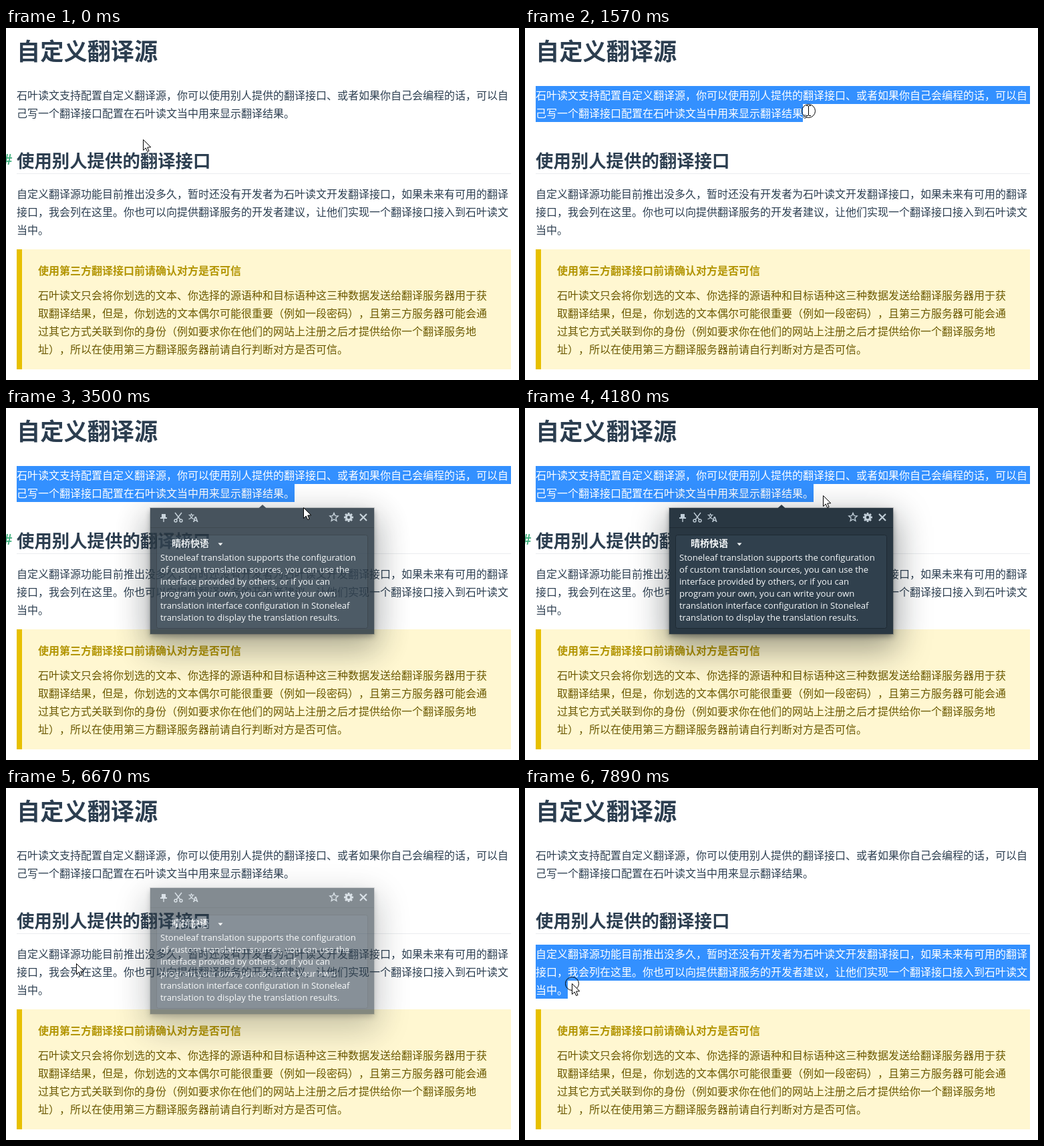
An HTML page with a canvas that plays this animation: 768x528 px, repeating every 8000 ms.

```html
<!DOCTYPE html>
<html lang="zh-CN">
<head>
<meta charset="utf-8">
<title>Selection translation</title>
<style>
html, body { margin: 0; width: 100%; height: 100%; overflow: hidden; background: #fff; }
canvas { display: block; }
</style>
</head>
<body>
<canvas id="stage" width="768" height="528"></canvas>
<script>
const W = 768, H = 528, LOOP = 8000;
const stage = document.getElementById('stage').getContext('2d');
const layer = document.createElement('canvas');
layer.width = W;
layer.height = H;
const pop = layer.getContext('2d');

const CJK = '"Noto Sans CJK SC", "Noto Sans CJK", sans-serif';
const LATIN = '"Open Sans", "Noto Sans", sans-serif';
const INK = '#2c3e50', BLUE = '#3390ff', PALE = '#f5f8fa';
const LEFT = 16, RIGHT = 756, SIZE = 16, ROW = 27;
const BOX = { x: 216, y: 150, w: 335, h: 189 };

const intro = { top: 87, lines: [
  '石叶读文支持配置自定义翻译源，你可以使用别人提供的翻译接口、或者如果你自己会编程的话，可以自',
  '己写一个翻译接口配置在石叶读文当中用来显示翻译结果。'
] };
const usage = { top: 235, lines: [
  '自定义翻译源功能目前推出没多久，暂时还没有开发者为石叶读文开发翻译接口，如果未来有可用的翻译',
  '接口，我会列在这里。你也可以向提供翻译服务的开发者建议，让他们实现一个翻译接口接入到石叶读文',
  '当中。'
] };
const warning = [
  '石叶读文只会将你划选的文本、你选择的源语种和目标语种这三种数据发送给翻译服务器用于获',
  '取翻译结果，但是，你划选的文本偶尔可能很重要（例如一段密码），且第三方服务器可能会通',
  '过其它方式关联到你的身份（例如要求你在他们的网站上注册之后才提供给你一个翻译服务地',
  '址），所以在使用第三方翻译服务器前请自行判断对方是否可信。'
];
const result = [
  'Stoneleaf translation supports the configuration',
  'of custom translation sources, you can use the',
  'interface provided by others, or if you can',
  'program your own, you can write your own',
  'translation interface configuration in Stoneleaf',
  'translation to display the translation results.'
];

// Pointer moves: start and end time, destination, optional bend.
const home = [205, 167];
const moves = [
  { from: 30, to: 780, end: [20, 98] },
  { from: 910, to: 1600, end: [425, 124], bend: [237, 90] },
  { from: 1940, to: 2430, end: [426, 129] },
  { from: 2960, to: 3200, end: [444, 152] },
  { from: 3340, to: 3680, end: [445, 148] },
  { from: 3840, to: 3900, end: [446, 131] },
  { from: 4180, to: 4210, end: [440, 126] },
  { from: 4400, to: 5020, end: [112, 288], bend: [100, 95] },
  { from: 5180, to: 5920, end: [345, 184], bend: [255, 356] },
  { from: 5990, to: 6450, end: [105, 263], bend: [290, 150] },
  { from: 7250, to: 7420, end: [18, 248] },
  { from: 7480, to: 7890, end: [70, 293] }
];

const within = (t, a, b) => t >= a && t < b;
const clamp = (v, a, b) => Math.min(b, Math.max(a, v));
const held = t => within(t, 910, 2710) || t >= 7480;

function pointer(t) {
  let at = home;
  for (const { from, to, end, bend } of moves) {
    if (t <= from) break;
    const e = Math.sin(clamp((t - from) / (to - from), 0, 1) * Math.PI / 2);
    at = at.map((a, k) => {
      const mid = bend ? bend[k] : (a + end[k]) / 2;
      return (1 - e) ** 2 * a + 2 * e * (1 - e) * mid + e * e * end[k];
    });
  }
  return { x: at[0], y: at[1] };
}

function chars(c, text, x, y, size, color, weight = 400) {
  c.font = `${weight} ${size}px ${CJK}`;
  c.fillStyle = color;
  [...text].forEach((ch, i) => c.fillText(ch, x + i * size, y));
}

function paragraph(block, sel) {
  block.lines.forEach((text, i) => {
    const top = block.top + i * ROW;
    chars(stage, text, LEFT, top + 20, SIZE, INK);
    if (!sel || i > sel.row) return;
    const end = i < sel.row ? RIGHT : LEFT + sel.col * SIZE;
    stage.save();
    stage.beginPath();
    stage.rect(LEFT, top, end - LEFT, ROW);
    stage.clip();
    stage.fillStyle = BLUE;
    stage.fillRect(LEFT, top, end - LEFT, ROW);
    chars(stage, text, LEFT, top + 20, SIZE, '#fff');
    stage.restore();
  });
}

// Selection from the start of a block to the pointer, which it trails slightly.
function dragged(block, t) {
  const p = pointer(t - 30);
  const row = clamp(Math.floor((p.y - block.top) / ROW), 0, block.lines.length - 1);
  const col = clamp(Math.round((p.x - LEFT) / SIZE), 0, block.lines[row].length);
  return { row, col };
}

function page(t) {
  stage.fillStyle = '#fff';
  stage.fillRect(0, 0, W, H);
  chars(stage, '自定义翻译源', LEFT, 48, 35.2, INK, 700);
  paragraph(intro, within(t, 910, 6620) ? dragged(intro, Math.min(t, 2700)) : null);
  chars(stage, '使用别人提供的翻译接口', LEFT, 209, 26.4, INK, 700);
  stage.fillStyle = '#eaecef';
  stage.fillRect(LEFT, 218, RIGHT - LEFT, 1);
  if (t < 660 || within(t, 3370, 4830)) {
    stage.font = `600 21px ${LATIN}`;
    stage.fillStyle = '#3eaf7c';
    stage.fillText('#', -4, 205);
  }
  paragraph(usage, t >= 7500 ? dragged(usage, t) : null);

  stage.fillStyle = '#fff7d1';
  stage.fillRect(LEFT, 332, 740, 180);
  stage.fillStyle = '#e7c000';
  stage.fillRect(LEFT, 332, 8, 180);
  chars(stage, '使用第三方翻译接口前请确认对方是否可信', 48, 370, SIZE, '#b29400', 700);
  warning.forEach((s, i) => chars(stage, s, 48, 407 + i * ROW, SIZE, '#6b5900'));
}

// Draws an icon around its centre.
function icon(draw, x, y, color = '#bfccd6') {
  pop.save();
  pop.translate(x, y);
  pop.fillStyle = pop.strokeStyle = color;
  pop.lineWidth = 1.4;
  pop.beginPath();
  draw(pop);
  pop.restore();
}

function poly(c, ...pts) {
  c.beginPath();
  pts.forEach(([x, y]) => c.lineTo(x, y));
  c.closePath();
}

function pin(c) {
  c.fillRect(-3, -5, 6, 6);
  c.fillRect(-5, 0, 10, 2);
  c.fillRect(-.7, 2, 1.4, 5);
}

function scissors(c) {
  [-1, 1].forEach(s => {
    c.moveTo(s * 5, -7);
    c.lineTo(s * -3, 3.5);
    c.moveTo(s * 4 + 2, 5);
    c.arc(s * 4, 5, 2, 0, 7);
  });
  c.stroke();
}

function letters(c) {
  c.font = `700 9px ${CJK}`;
  c.fillText('文', -7, 2);
  c.font = `700 11px ${LATIN}`;
  c.fillText('A', 0, 7);
}

function star(c) {
  poly(c, ...Array.from({ length: 10 }, (_, i) => {
    const a = i * Math.PI / 5, r = i % 2 ? 3 : 6.5;
    return [Math.sin(a) * r, -Math.cos(a) * r];
  }));
  c.stroke();
}

function cog(c) {
  c.lineWidth = 3;
  c.arc(0, 0, 3.7, 0, 7);
  c.stroke();
  for (let i = 0; i < 8; i++) {
    c.fillRect(-1.4, -7, 2.8, 3);
    c.rotate(Math.PI / 4);
  }
}

function cross(c) {
  c.lineWidth = 2.2;
  [-5, 5].forEach(s => { c.moveTo(-5, s); c.lineTo(5, -s); });
  c.stroke();
}

function caret(c) {
  poly(c, [-3.5, -1.5], [3.5, -1.5], [0, 2.5]);
  c.fill();
}

function speaker(c) {
  poly(c, [-6, -2], [-4, -2], [-.5, -5], [-.5, 5], [-4, 2], [-6, 2]);
  c.fill();
  [3, 5.5].forEach(r => {
    c.beginPath();
    c.arc(0, 0, r, -.8, .8);
    c.stroke();
  });
}

function copy(c) {
  c.strokeRect(-5, -2, 7, 7);
  c.moveTo(-2, -2);
  c.lineTo(-2, -5); c.lineTo(5, -5); c.lineTo(5, 2); c.lineTo(2, 2);
  c.stroke();
}

function share(c) {
  c.moveTo(0, -4);
  c.lineTo(-5, -4); c.lineTo(-5, 5); c.lineTo(4, 5); c.lineTo(4, 1);
  c.moveTo(-1, 1); c.lineTo(5, -5);
  c.moveTo(1.5, -5); c.lineTo(5, -5); c.lineTo(5, -1.5);
  c.stroke();
}

// Casts a shadow alone: the rectangle itself stays off the canvas.
function shadow(dy, blur, grow, alpha) {
  const away = 2000;
  pop.save();
  pop.shadowColor = `rgba(16,22,26,${alpha})`;
  pop.shadowBlur = blur;
  pop.shadowOffsetX = away;
  pop.shadowOffsetY = dy;
  pop.fillStyle = '#000';
  pop.fillRect(BOX.x - grow - away, BOX.y - grow, BOX.w + 2 * grow, BOX.h + 2 * grow);
  pop.restore();
}

function popup(hover, notch) {
  pop.clearRect(0, 0, W, H);
  shadow(18, 46, 6, .4);
  shadow(4, 8, 0, .4);
  shadow(0, 0, 1, .2);
  pop.fillStyle = '#293742';
  if (notch) {
    poly(pop, [378, 150.5], [384, 145], [390, 150.5]);
    pop.fill();
  }
  pop.fillRect(BOX.x, BOX.y, BOX.w, BOX.h);
  pop.fillStyle = '#1f2b34';
  pop.fillRect(BOX.x, 179, BOX.w, 1);
  pop.fillStyle = '#30404d';
  pop.strokeStyle = '#1e2a33';
  pop.lineWidth = 1;
  pop.beginPath();
  pop.roundRect(225.5, 190.5, 316, 140, 3);
  pop.fill();
  pop.stroke();

  [pin, scissors, letters].forEach((draw, i) => icon(draw, 236 + i * 22, 164));
  [star, cog, cross].forEach((draw, i) => icon(draw, 491 + i * 22, 164));
  chars(pop, '晴桥快语', 248, 208, 14, PALE, 700);
  icon(caret, 321, 204, PALE);
  pop.font = `500 13.1px ${LATIN}`;
  pop.fillStyle = PALE;
  result.forEach((s, i) => pop.fillText(s, 231, 229 + i * 18));
  if (hover) {
    const gray = '#a7b6c2';
    icon(speaker, 337, 203, gray);
    icon(copy, 506, 203, gray);
    icon(share, 526, 203, gray);
    icon(speaker, 510, 316, gray);
  }
}

function popupAlpha(t) {
  if (!within(t, 3340, 7030)) return 0;
  if (t < 3680) return 1 - ((3680 - t) / 340) ** 3;
  return t < 6610 ? 1 : ((7030 - t) / 420) ** 3.5;
}

function beam(x, y) {
  stage.save();
  stage.globalCompositeOperation = 'difference';
  stage.fillStyle = '#fff';
  stage.fillRect(x, y - 7, 1, 14);
  [-8, 7].forEach(dy => {
    stage.fillRect(x - 3, y + dy, 3, 1);
    stage.fillRect(x + 1, y + dy, 3, 1);
  });
  stage.restore();
}

function arrow(x, y) {
  stage.save();
  stage.translate(x + .5, y + .5);
  poly(stage, [0, 0], [0, 16], [3.7, 12.5], [6.2, 18], [8.6, 17], [6.2, 11.6], [11.3, 11.3]);
  stage.fillStyle = '#fff';
  stage.strokeStyle = '#000';
  stage.lineWidth = 1;
  stage.fill();
  stage.stroke();
  stage.restore();
}

function cursor(t, p) {
  const x = Math.round(p.x), y = Math.round(p.y);
  if (held(t)) {
    stage.strokeStyle = '#000';
    stage.lineWidth = 1;
    stage.beginPath();
    stage.arc(x + .5, y + .5, 10, 0, 7);
    stage.stroke();
  }
  (within(t, 660, 2980) ? beam : arrow)(x, y);
}

function draw(t) {
  const p = pointer(t), alpha = popupAlpha(t);
  page(t);
  if (within(t, 2730, 3340)) {
    stage.fillStyle = '#4a8ef0';
    stage.fillRect(437, 141, 20, 20);
  }
  if (alpha > 0) {
    const over = within(p.x, BOX.x, BOX.x + BOX.w) && within(p.y, BOX.y, BOX.y + BOX.h);
    popup(t > 5000 && over, t < 6610);
    stage.globalAlpha = alpha;
    stage.drawImage(layer, 0, 0);
    stage.globalAlpha = 1;
  }
  cursor(t, p);
}

const start = performance.now();
function tick() {
  draw((performance.now() - start) % LOOP);
  requestAnimationFrame(tick);
}
tick();
</script>
</body>
</html>
```
